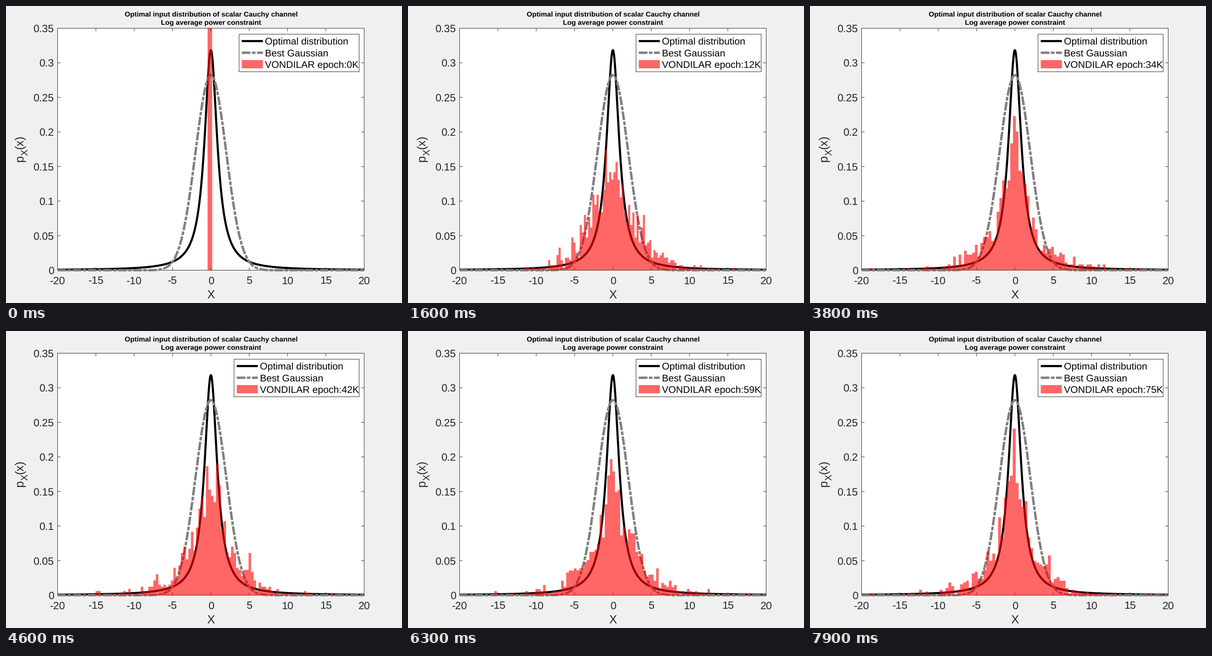
These frames come from a looping animation (864x648 px, 8 s). A matplotlib script:

```python
from math import gamma

import numpy as np
import matplotlib.pyplot as plt
from matplotlib.animation import FuncAnimation
from matplotlib.patches import Polygon, Rectangle

W, H = 864, 648
LEFT, RIGHT, TOP, BOTTOM = 112.5, 781.5, 48.5, 576.5
INK = (0.15, 0.15, 0.15)
GRAY = (0.5, 0.5, 0.5)
RED = (1, 0, 0, 0.6)
FRAMES, STEP = 80, 100
SAMPLES, BINS = 1000, 100

plt.rcParams.update({
    "font.family": "Liberation Sans",
    "text.hinting": "none",
    "path.snap": False,
    "lines.scale_dashes": False,
    "lines.dash_capstyle": "butt",
    "lines.solid_capstyle": "butt",
})


def px(x):
    return LEFT + (x + 20) / 40 * (RIGHT - LEFT)


def py(p):
    return BOTTOM - p / 0.35 * (BOTTOM - TOP)


def samples(epoch):
    """Generalised normal draws: a tight block that spreads into a peak with long tails."""
    rng = np.random.default_rng(700 + epoch)
    growth = min(1, epoch / 5)
    shape = np.interp(epoch, [0, 5, 12, 26, 50, 75], [8, 1.5, 1.35, 0.88, 1.12, 0.88])
    spread = 0.13 + 2.5 * growth
    alpha = spread * gamma(1 / shape) / gamma(2 / shape)
    size = alpha * rng.gamma(1 / shape, size=SAMPLES) ** (1 / shape)
    x = rng.choice([-1, 1], SAMPLES) * size - 0.13 * (1 - growth)
    return x[np.abs(x) < 19.4]


def outline(epoch):
    dens, edges = np.histogram(samples(epoch), BINS, density=True)
    xs = px(np.repeat(edges, 2))
    ys = py(np.concatenate([[0], np.repeat(dens, 2), [0]]))
    return np.column_stack([xs, ys])


fig = plt.figure(figsize=(W / 72, H / 72), dpi=72, facecolor="#f0f0f0")
ax = fig.add_axes([0, 0, 1, 1])
ax.set_xlim(0, W)
ax.set_ylim(H, 0)
ax.axis("off")


def label(x, y, s, size, color=INK, ha="center", **kw):
    return ax.text(x, y, s, fontsize=size, color=color, ha=ha, va="baseline", **kw)


def line(xs, ys, color=INK, lw=1, z=2, **kw):
    return ax.plot(xs, ys, color=color, lw=lw, zorder=z, **kw)[0]


def rect(x, y, w, h, fc, z, ec="none", lw=0):
    return ax.add_patch(Rectangle((x, y), w, h, fc=fc, ec=ec, lw=lw, zorder=z))


# plot box, ticks and labels
rect(LEFT, TOP, RIGHT - LEFT, BOTTOM - TOP, "white", 1, INK, 1)
TICK = 6.5
for v in range(-20, 21, 5):
    x = px(v)
    line([x, x], [BOTTOM, BOTTOM - TICK])
    line([x, x], [TOP, TOP + TICK])
    label(x + 0.3, 607, str(v), 23.3)
for k in range(8):
    y = py(k * 0.05)
    line([LEFT, LEFT + TICK], [y, y])
    line([RIGHT, RIGHT - TICK], [y, y])
    label(104.8, y + 8.3, f"{k * 0.05:.2g}", 23.3, ha="right")

label(447.5, 23, "Optimal input distribution of scalar Cauchy channel", 15.4, "black", weight="bold")
label(447.5, 42, "Log average power constraint", 15.4, "black", weight="bold")
label(447.5, 638.5, "X", 25.7)
for x, y, s, size in ((38, 340, "p", 25.7), (48, 325.5, "X", 20.5), (38, 312, "(x)", 25.7)):
    label(x, y, s, size, ha="left", rotation=90, rotation_mode="anchor")

# reference curves and histogram
DASH = (0, (19, 3, 8, 3))
grid = np.linspace(-20, 20, 1601)
cauchy = line(px(grid), py(1 / (np.pi * (1 + grid ** 2))), "black", 4.6, 3)
gauss = line(px(grid), py(np.exp(-grid ** 2 / 8) / np.sqrt(4 * np.pi)), GRAY, 5.2, 4, ls=DASH)
bars = ax.add_patch(Polygon(outline(0), closed=True, fc=RED, ec="none", lw=0, zorder=5))
clip = Rectangle((LEFT, TOP), RIGHT - LEFT, BOTTOM - TOP + 2, transform=ax.transData)
for art in (cauchy, gauss, bars):
    art.set_clip_path(clip)

# legend
frame = rect(0, 61.5, 1, 82, "white", 6, INK, 1)
keys = [line([0, 1], [76.5, 76.5], "black", 4.6, 7),
        line([0, 1], [102, 102], GRAY, 5.2, 7, ls=DASH)]
swatch = rect(0, 118, 46, 18, RED, 7)
names = [label(0, y, s, 21.2, "black", "left", zorder=7)
         for y, s in ((84, "Optimal distribution"), (109.5, "Best Gaussian"), (135, ""))]


def update(i):
    epoch = max(0, i - 4)
    bars.set_xy(outline(epoch))
    x0 = 508.5 if epoch < 10 else 497.5
    frame.set_x(x0)
    frame.set_width(770.5 - x0)
    for key in keys:
        key.set_xdata([x0 + 6, x0 + 52])
    swatch.set_x(x0 + 6)
    for name in names:
        name.set_x(x0 + 56.5)
    names[2].set_text(f"VONDILAR epoch:{epoch}K")
    return [bars, frame, swatch, *keys, *names]


anim = FuncAnimation(fig, update, frames=FRAMES, interval=STEP, repeat=True, repeat_delay=0, blit=False)
plt.show()
```
